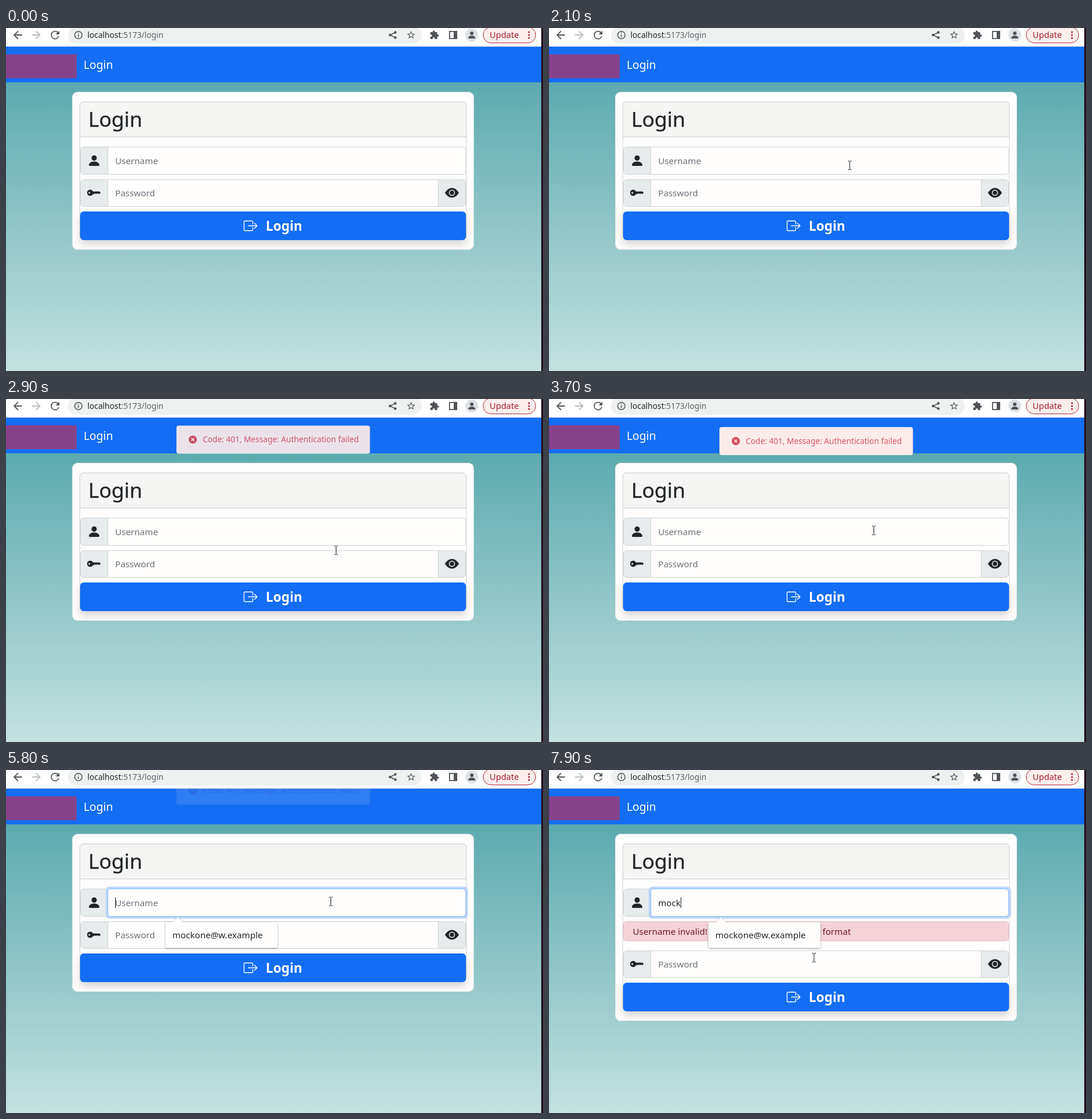
An HTML page that plays this animation: 920 px wide and 587 px high, repeating every 8 s.

```html
<!DOCTYPE html>
<html lang="en">
<head>
<meta charset="utf-8">
<title>Login form</title>
<style>
  html, body { margin: 0; width: 100%; height: 100%; overflow: hidden; }
  svg { display: block; width: 920px; height: 587px; font: 15.1px "Noto Sans", "Open Sans", sans-serif; }
  .box { fill: #fffefd; stroke: #ced4da; }
  .addon { fill: #e8ebec; stroke: #ced4da; }
  .hint { fill: #6a7177; }
  .ink { fill: #212529; }
  .line { fill: none; stroke: #505357; stroke-width: 1.5; }
  .shadow { filter: drop-shadow(0 7px 7px rgba(0, 0, 0, .17)); }
</style>
</head>
<body>
<svg viewBox="0 0 920 587">
  <defs>
    <linearGradient id="sky" x2="0" y2="1">
      <stop stop-color="#5caaae"/><stop offset="1" stop-color="#c5e1e0"/>
    </linearGradient>
    <path id="back" d="M20 11H7.83l5.59-5.59L12 4l-8 8 8 8 1.41-1.41L7.83 13H20z"/>
    <path id="person" d="M3 14s-1 0-1-1 1-4 6-4 6 3 6 4-1 1-1 1H3zm5-6a3 3 0 1 0 0-6 3 3 0 0 0 0 6z"/>
  </defs>

  <!-- page -->
  <rect y="93" width="920" height="494" fill="url(#sky)"/>
  <rect y="32" width="920" height="61" fill="#136ef5"/>
  <rect y="45" width="121" height="41" fill="#86438c"/>
  <text x="133" y="70" font-size="19.2" fill="#fff">Login</text>

  <!-- card -->
  <rect id="card" x="113.5" y="109.5" width="688" rx="9" fill="#fffefd" stroke="#bdd6d7"/>
  <path id="frame" fill="none" stroke="#cfd2d2"/>
  <path d="M126.5 186.5V132a5.5 5.5 0 0 1 5.5-5.5h651a5.5 5.5 0 0 1 5.5 5.5v54.500z" fill="#f5f5f4" stroke="#c9cccc"/>
  <text x="141" y="169" font-size="35.300" font-weight="500" class="ink" stroke="#212529" stroke-width=".3">Login</text>

  <!-- user name -->
  <rect class="addon" x="127.500" y="203.500" width="660" height="47" rx="6"/>
  <path class="box" d="M174.500 203.500H782a6 6 0 0 1 6 6v35a6 6 0 0 1-6 6H174.500z"/>
  <use href="#person" class="ink" transform="translate(139 215) scale(1.5)"/>
  <g id="focus" fill="none">
    <rect x="172.500" y="201.500" width="617" height="51" rx="5" stroke="#bfd6f8" stroke-width="4"/>
    <rect x="174.500" y="203.500" width="613" height="47" rx="4" stroke="#86b7fe"/>
  </g>
  <text id="userHint" class="hint" x="187" y="232.500">Username</text>
  <text id="typed" class="ink" x="187" y="232.500"></text>
  <rect id="caret" y="218" width="1" height="18" fill="#111"/>

  <g id="alert" fill="#74182a">
    <rect x="127.500" y="259.500" width="660" height="33" rx="5" fill="#f4d2d8" stroke="#e8bac2"/>
    <text x="143.500" y="281.500">Username invalid!</text>
    <text x="468.500" y="281.500">format</text>
  </g>

  <!-- password and button -->
  <g id="lower">
    <rect class="addon" x="127.500" y="259.500" width="660" height="46" rx="6"/>
    <rect class="box" x="174.500" y="259.500" width="566" height="46"/>
    <path class="ink" transform="translate(139 270) scale(1.5)" d="M3.500 11.500a3.500 3.500 0 1 1 3.163-5H14L15.500 8 14 9.500l-1-1-1 1-1-1-1 1-1-1-1 1H6.663a3.500 3.500 0 0 1-3.163 2zM2.500 9a1 1 0 1 0 0-2 1 1 0 0 0 0 2z"/>
    <g class="ink" transform="translate(752 270) scale(1.5)">
      <circle cx="8" cy="8" r="2.500"/>
      <path d="M0 8s3-5.500 8-5.500S16 8 16 8s-3 5.500-8 5.500S0 8 0 8zm8 3.500a3.500 3.500 0 1 0 0-7 3.500 3.500 0 0 0 0 7z"/>
    </g>
    <text class="hint" x="187" y="287.500">Password</text>
    <rect id="button" class="shadow" x="127" y="314" width="661" height="49" rx="6"/>
    <path transform="translate(407 326.500) scale(1.5)" fill="none" stroke="#fff" stroke-width=".9" stroke-linecap="round" stroke-linejoin="round"
      d="M10.500 6V3.500a1 1 0 0 0-1-1h-8a1 1 0 0 0-1 1v9a1 1 0 0 0 1 1h8a1 1 0 0 0 1-1V10M5.500 8h10M12.500 5l3 3-3 3"/>
    <text x="445" y="346.500" font-size="22.500" font-weight="700" fill="#fff">Login</text>
  </g>

  <!-- suggestion -->
  <g id="popup">
    <path d="M276 260.500h10l8.500-8.500 8.500 8.500h159a3 3 0 0 1 3 3v38a3 3 0 0 1-3 3H276a3 3 0 0 1-3-3v-38a3 3 0 0 1 3-3z" fill="#fffefd" style="filter: drop-shadow(0 1px 1.500px rgba(0,0,0,.4))"/>
    <text class="ink" x="285" y="287.500">mockone@w.example</text>
  </g>

  <!-- message -->
  <g id="toast">
    <rect x="292" y="48" width="331.500" height="48" rx="4" fill="#fbebea"/>
    <circle cx="320" cy="72" r="7" fill="#d2505f"/>
    <path d="M317.500 69.500l5 5m0-5l-5 5" stroke="#fbebea" stroke-width="1.500"/>
    <text x="337" y="77" font-size="13.600" fill="#da5766">Code: 401, Message: Authentication failed</text>
  </g>

  <!-- browser bar -->
  <rect width="920" height="32" fill="#fff"/>
  <path d="M0 31.500h920" stroke="#d9dcdf"/>
  <rect x="106" y="-3" width="606" height="30" rx="15" fill="#eff1f1"/>
  <g fill="#505357">
    <use href="#back" transform="translate(9 1) scale(.92)"/>
    <use href="#back" transform="translate(63 1) scale(-.92 .92)" fill="#b9bcbf"/>
    <path transform="translate(73 1) scale(.92)" d="M17.650 6.350A8 8 0 0 0 12 4a8 8 0 1 0 7.730 10h-2.080A6 6 0 1 1 12 6c1.660 0 3.140.69 4.220 1.780L13 11h7V4z"/>
    <circle class="line" cx="124" cy="12" r="6.300"/>
    <path class="line" d="M124 8v1.600M124 11v4.500"/>
    <path class="line" d="M667 7.500l-9 4.500 9 4.500"/>
    <circle cx="667" cy="7.500" r="2.200"/><circle cx="658" cy="12" r="2.200"/><circle cx="667" cy="16.500" r="2.200"/>
    <path transform="translate(685.600 3.500) scale(.7)" d="M22 9.240l-7.190-.62L12 2 9.190 8.630 2 9.240l5.460 4.730L5.820 21 12 17.270 18.180 21l-1.630-7.030zM12 15.400l-3.760 2.270 1-4.280-3.320-2.880 4.380-.38L12 6.100l1.710 4.040 4.380.38-3.320 2.880 1 4.280z"/>
    <path transform="translate(725.500 3.500) scale(.7)" d="M20.500 11H19V7a2 2 0 0 0-2-2h-4V3.500a2.500 2.500 0 0 0-5 0V5H4a2 2 0 0 0-2 2v3.800h1.500a2.700 2.700 0 0 1 0 5.400H2V20a2 2 0 0 0 2 2h3.800v-1.500a2.700 2.700 0 0 1 5.400 0V22H17a2 2 0 0 0 2-2v-4h1.500a2.500 2.500 0 0 0 0-5z"/>
    <path d="M759 5h14v14h-14zm1.800 1.800v10.400h6.200V6.800z" fill-rule="evenodd"/>
    <circle cx="798" cy="12" r="11" fill="#dde1e6"/>
    <use href="#person" transform="translate(790 4)"/>
  </g>
  <text x="139.500" y="17" font-size="13.700" fill="#5f6368"><tspan fill="#25282b">localhost</tspan>:5173/login</text>
  <rect x="817.500" y="-1.500" width="90" height="27" rx="13.500" fill="#fbeeed" stroke="#b02a35"/>
  <text x="828.500" y="17" font-size="14.600" fill="#a8202c">Update</text>
  <g fill="#a8202c"><circle cx="896" cy="7" r="1.600"/><circle cx="896" cy="12" r="1.600"/><circle cx="896" cy="17" r="1.600"/></g>
  <rect x="917" width="3" height="587" fill="#24101e"/>

  <!-- pointer -->
  <g id="pointer">
    <path id="arrow" d="M0 0v14l3.300-3 2.200 5 2-.9-2.100-4.900H10z" stroke="#fff"/>
    <path id="hand" transform="translate(-5.500 -1)" d="M4 9V1.500a1.500 1.500 0 0 1 3 0V6l6.500 1.200q1.500.5 1.300 2L14 13l-1 3H6l-3-4.500-2.500-2.500q0-1.500 1.500-1.500z" fill="#fff" stroke="#000"/>
    <g id="beam" fill="none">
      <path d="M-3-7.500h2l1 1 1-1h2M0-6.500v13M-3 7.500h2l1-1 1 1h2" stroke="#fff" stroke-width="2.500"/>
      <path d="M-3-7.500h2l1 1 1-1h2M0-6.500v13M-3 7.500h2l1-1 1 1h2" stroke="#111"/>
    </g>
  </g>
</svg>
<script>
const LOOP = 8000, STEP = 100, WORD = "mock";
const path = [ // time, x, y
  [600, 255, 149], [900, 400, 245], [1300, 513, 231.5], [2050, 513, 231.5],
  [2500, 577, 335], [2650, 577, 335], [2900, 565.5, 259], [3300, 557, 226],
  [3700, 556.5, 225], [7520, 556.5, 225], [7900, 454, 321]
];
const $ = id => document.getElementById(id);
const set = (id, attrs) => { for (const k in attrs) $(id).setAttribute(k, attrs[k]); };
const show = (id, on) => set(id, { visibility: on ? "visible" : "hidden" });
const clamp = v => Math.min(1, Math.max(0, v));
const smooth = v => v * v * (3 - 2 * v);

function pointerAt(t) {
  const i = path.findIndex(p => p[0] > t);
  if (i < 0) return path[path.length - 1].slice(1);
  if (i === 0) return path[0].slice(1);
  const [a, b] = [path[i - 1], path[i]];
  const k = smooth((t - a[0]) / (b[0] - a[0]));
  return [a[1] + (b[1] - a[1]) * k, a[2] + (b[2] - a[2]) * k];
}

function draw(t) {
  const invalid = t >= 5900, drop = invalid ? 50 : 0;

  set("card", { height: 270 + drop });
  set("frame", { d: `M126.5 180V${358 + drop}M788.5 180V${358 + drop}` });
  set("lower", { transform: `translate(0 ${drop})` });
  show("alert", invalid);

  const [x, y] = pointerAt(t), inButton = y > 314 + drop && y < 363 + drop;
  const kind = inButton ? "hand" : y < 200 ? "arrow" : "beam";
  set("pointer", { transform: `translate(${x} ${y})` });
  for (const id of ["arrow", "hand", "beam"]) show(id, t >= 600 && id === kind);
  set("button", { fill: inButton ? "#0f5bd0" : "#136ef5" });

  const focused = t >= 4100;
  set("focus", { opacity: focused ? clamp((t - 4000) / 220) : 0 });
  show("popup", t >= 4200);

  const count = t < 5900 ? 0 : t < 6100 ? 1 : t < 6700 ? 2 : 4;
  $("typed").textContent = WORD.slice(0, count);
  show("userHint", !count);
  set("caret", { x: 187 + (count ? $("typed").getComputedTextLength() : 0) });
  show("caret", focused && !(t >= 4800 && t < 5300) && !(t >= 7300 && t < 7800));

  const enter = 1 - (1 - clamp((t - 2600) / 400)) ** 2;
  const leave = smooth(clamp((t - 5580) / 280));
  set("toast", {
    opacity: enter * (1 - leave),
    transform: `translate(0 ${-42 * (1 - enter + leave)})`
  });
}

function tick(now) {
  draw(Math.floor(now % LOOP / STEP) * STEP);
  requestAnimationFrame(tick);
}
draw(0);
requestAnimationFrame(tick);
</script>
</body>
</html>
```
